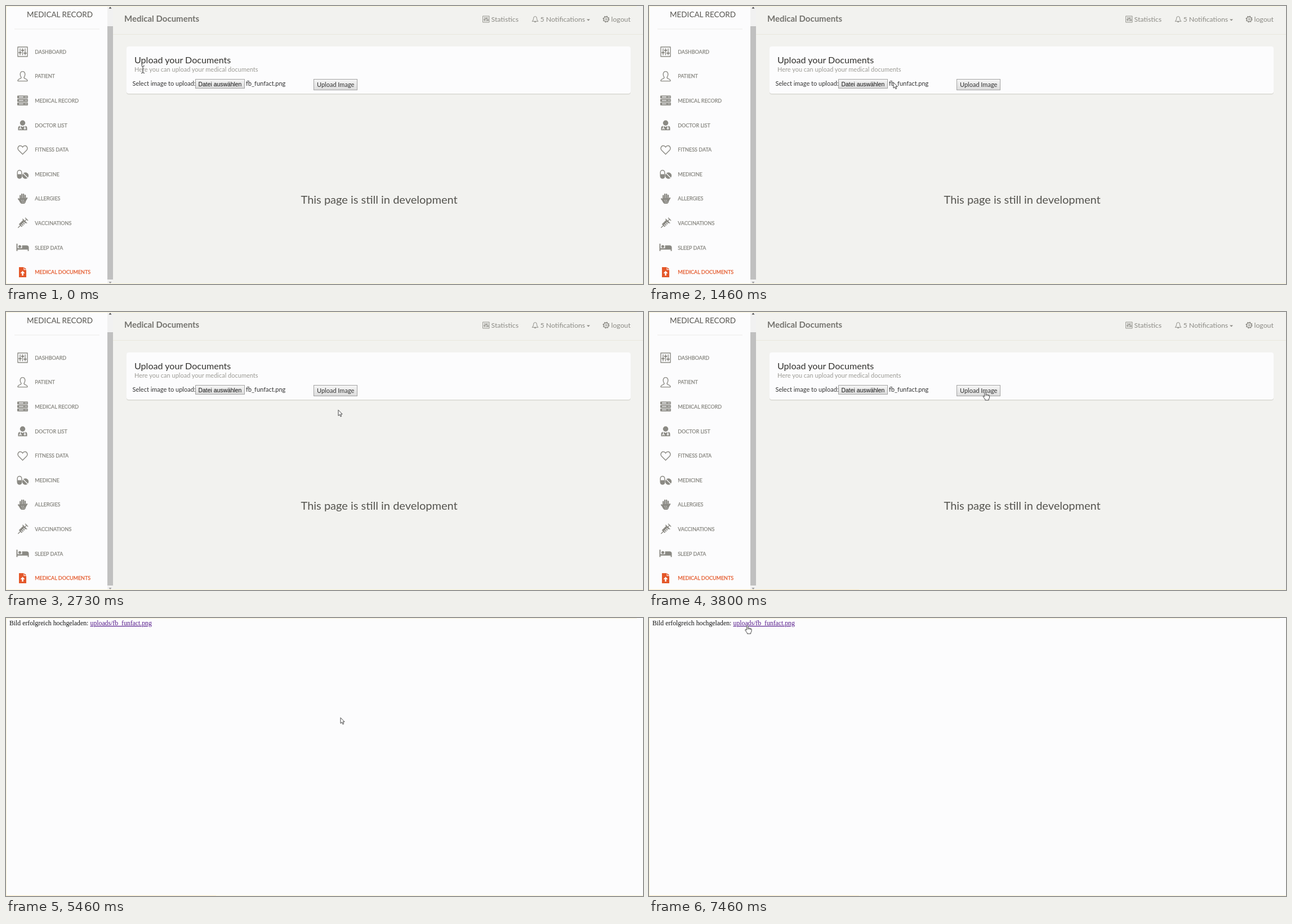
Recreate the animation shown at these times as an HTML page. Size 1131 px wide and 495 px high, loop 8000 ms.

```html
<!DOCTYPE html>
<html lang="en">
<head>
<meta charset="utf-8">
<title>Medical Documents</title>
<style>
  html, body { margin: 0; width: 100%; height: 100%; overflow: hidden; background: #fcfcfd; }
  svg { display: block; width: 1131px; height: 495px; }
  text { font-family: Lato, "Open Sans", sans-serif; white-space: pre; }
  .arial { font-family: "Liberation Sans", Arial, sans-serif; }
  .times text { font-family: "Liberation Serif", "Times New Roman", serif; font-size: 11.75px; }
  .menu text { font-size: 9px; stroke-width: .25px; }
  .line { fill: none; stroke: #8b8a84; stroke-width: 1.4; stroke-linejoin: round; stroke-linecap: round; }
  .solid { fill: #8b8a84; }
  .white { fill: none; stroke: #fcfcfd; stroke-width: 1.3; }
</style>
</head>
<body>
<svg viewBox="0 0 1131 495">
  <defs>
    <linearGradient id="face" x2="0" y2="1">
      <stop stop-color="#f6f6f6"/><stop offset="1" stop-color="#dcdcdc"/>
    </linearGradient>
    <g id="sliders">
      <rect x="-8.5" y="-8.5" width="17" height="17"/>
      <path d="M-4.5-5.500V5.500M0-5.500V5.500M4.500-5.500V5.500"/>
      <path d="M-6 1.500h3M-1.500-2.500h3M3 2.500h3" stroke-width="2.400"/>
    </g>
  </defs>

  <g id="portal">
    <rect width="1131" height="495" fill="#f2f2ef"/>
    <rect width="180" height="495" fill="#fcfcfd"/>
    <path d="M15 41H166" stroke="#ecebe8"/>
    <text x="37" y="19.5" font-size="13.5" fill="#55544f">MEDICAL RECORD</text>
    <g id="menu" class="menu"></g>

    <rect x="180" width="10" height="495" fill="#f1f1f1"/>
    <rect x="180" y="36" width="10" height="451" fill="#c0c0c0"/>
    <path d="M182.500 4.500L185 1.500L187.500 4.500Z" fill="#444"/>
    <path d="M182.500 491L185 494L187.500 491Z" fill="#999"/>

    <path d="M190 50.500H1131" stroke="#e9e7dc"/>
    <text x="210" y="27.500" font-size="15" font-weight="700" fill="#74736e">Medical Documents</text>
    <g class="line" stroke-width="1">
      <use href="#sliders" transform="translate(852.500 23.500) scale(.65)"/>
      <path d="M934.500 27Q936.500 25.500 936.500 22.500Q936.500 18.500 939.500 18.500T942.500 22.500Q942.500 25.500 944.500 27ZM938.500 28.500h2" style="stroke-width:1"/>
      <circle cx="1065.500" cy="23.500" r="4.300"/>
      <circle cx="1065.500" cy="23.500" r="1.600" style="stroke-width:1"/>
      <circle cx="1065.500" cy="23.500" r="5.300" style="stroke-dasharray:2 2.160;stroke-linecap:butt"/>
    </g>
    <g font-size="12.3" fill="#8b8a84">
      <text x="861.500" y="28">Statistics</text>
      <text x="948.500" y="28">5 Notifications</text>
      <text x="1074.500" y="28">logout</text>
      <path d="M1031 23.500h6l-3 3Z"/>
    </g>

    <rect x="214" y="73.500" width="895" height="84" rx="4" fill="#d9d8d2"/>
    <rect x="214" y="72" width="895" height="84" rx="4" fill="#fcfcfd"/>
    <text x="228" y="102" font-size="16.1" fill="#33322f">Upload your Documents</text>
    <text x="228" y="117" font-size="11" fill="#9c9b95">Here you can upload your medical documents</text>
    <g font-size="11" fill="#333">
      <text x="224.500" y="142">Select image to upload:</text>
      <text x="426" y="142">fb_funfact.png</text>
      <g fill="url(#face)" stroke="#a3a3a3">
        <rect x="336.500" y="130.500" width="87" height="16"/>
        <rect x="546.500" y="130.500" width="77" height="19"/>
      </g>
      <text x="341.500" y="142.500" class="arial" font-size="10.4" fill="#111">Datei auswählen</text>
      <text x="552" y="144">Upload Image</text>
    </g>
    <text x="523.500" y="352" font-size="20" fill="#55544f">This page is still in development</text>
    <g id="tip">
      <rect x="436" y="151" width="64" height="15" fill="#bbb" opacity=".6"/>
      <rect x="434.500" y="149.500" width="63" height="14" fill="#fcfcfd" stroke="#aaa"/>
      <text x="438" y="160" font-size="8.900" fill="#888">fb_funfact.png</text>
    </g>
  </g>

  <g id="done" class="times">
    <rect width="1131" height="495" fill="#fcfcfd"/>
    <text x="6" y="13" fill="#111">Bild erfolgreich hochgeladen:</text>
    <text x="149.500" y="13" fill="#551a8b" text-decoration="underline">uploads/fb_funfact.png</text>
  </g>

  <path d="M1120 .5H.5V494.500H1131" fill="none" stroke="#faf3d6"/>
  <path id="edge" d="M0 494.500H373" stroke="#fae9c2"/>

  <g id="cursor" fill="#fff" stroke="#333" stroke-linejoin="round">
    <path id="beam" d="M-3-6.500Q0-6.500 0-5Q0-6.500 3-6.500M0-5V5M-3 6.500Q0 6.500 0 5Q0 6.500 3 6.500" fill="none"/>
    <path id="arrow" d="M0 0V10.200L2.400 8L4 11.800L5.700 11L4.100 7.400H7.200Z" stroke-width=".9"/>
    <path id="hand" d="M-1.200 1.200Q0-.6 1.200 1.200V5Q2.500 4 3.400 5.400Q4.700 4.500 5.600 6Q7.400 5.500 7.500 7.200V10Q7.500 12 6.200 13V15H-.2V13.500L-3.600 9Q-4 7-2.300 7.500L-1.200 8.700ZM1.200 5V7.500M3.400 5.500V7.500M5.600 6V8" stroke-width=".9"/>
  </g>
</svg>

<script>
const LOOP = 8000, STEP = 200 / 3, PAGE_SWAP = 5460;
const $ = id => document.getElementById(id);

// Each icon is drawn around its own centre.
const menu = [
  ['DASHBOARD', '<use href="#sliders" class="line"/>'],
  ['PATIENT', '<path class="line" d="M-2.500 2Q-4.500-1-4.300-4Q-3.800-8.500 0-8.500T4.300-4Q4.500-1 2.500 2Q2.500 4 5 4.500Q8.500 5.300 8.500 8.500H-8.500Q-8.500 5.300-5 4.500Q-2.500 4-2.500 2Z"/>'],
  ['MEDICAL RECORD', [-6.7, -.5, 5.7].map(y =>
    `<rect class="solid" x="-9.500" y="${y - 2.6}" width="19" height="5.200" rx="1"/><path class="white" d="M-6.500 ${y}h8M4 ${y}h1.500M6.500 ${y}h1.500"/>`).join('')],
  ['DOCTOR LIST', '<circle class="solid" cy="-4" r="4.700"/><path class="solid" d="M-8 9V5Q-8 1.500-4 1.300L0 3L4 1.300Q8 1.500 8 5V9Z"/><path class="white" d="M-4 1V5M4 1V4M-5.500 7.500Q-5.500 5-4 5T-2.500 7.500"/><circle class="white" cx="4" cy="5.500" r="1.200"/>'],
  ['FITNESS DATA', '<path class="line" d="M0 8L-7.200.8C-10-2.500-7.500-7.500-4-7.200C-2-7.200-.8-5.800 0-4.500C.8-5.800 2-7.200 4-7.200C7.500-7.500 10-2.500 7.200.8Z"/>'],
  ['MEDICINE', '<rect class="line" x="-9.300" y="-7" width="7.600" height="14" rx="3.800"/><path class="solid" d="M-9.500 0H-1.500V4A4 4 0 0 1-9.500 4Z"/><circle class="solid" cx="5" cy="2.500" r="5.700"/><path class="white" d="M1-1.500L9 6.500"/>'],
  ['ALLERGIES', '<path d="M-4.200 0V-5.500M-1.400 0V-8M1.600 0V-8M4.500 0V-6M-4 4L-7.300.3M4.500 4L7.500-1" fill="none" stroke="#8b8a84" stroke-width="2.400" stroke-linecap="round"/><path class="solid" d="M-5.500-1H5.800V3Q5.500 9 2 9H-2Q-4 8.500-6 4Z"/><path class="white" stroke-dasharray="1 2" d="M-2 3H4M-1 6H3"/>'],
  ['VACCINATIONS', '<g transform="rotate(45)"><rect class="solid" x="-3.500" y="-5" width="7" height="11"/><path class="line" d="M0 6V11M0-5V-10M-3-10H3M-5-5.300H5"/><path class="white" d="M0-2.500H3.500M0 .5H3.500M0 3.500H3.500"/></g>'],
  ['SLEEP DATA', '<path class="solid" d="M-11-7H-9V1H-1V-4H7Q11-4 11 0V6H9V3.500H-9V6H-11Z"/><circle class="solid" cx="-5" cy="-2" r="2.500"/>'],
  ['MEDICAL DOCUMENTS', '<path fill="#e4582a" d="M-6.500-9H2V-4H6.500V9H-6.500ZM3-9L6.500-5H3Z"/><path fill="#fff" d="M0-2.500L4 2H1.300V6H-1.300V2H-4Z"/>']
];
$('menu').innerHTML = menu.map(([label, icon], i) => {
  const y = 81.5 + i * 43.6, color = i === menu.length - 1 ? '#e4582a' : '#85847e';
  return `<g transform="translate(29.500 ${y})">${icon}<text x="21.700" y="3.300" fill="${color}" stroke="${color}">${label}</text></g>`;
}).join('');

// Pointer stops: time, x, y
const stops = [
  [0, 243, 113], [400, 243, 113], [933, 420.5, 145.5], [1200, 434, 136],
  [1667, 434, 136], [2000, 590, 174.5], [3000, 590, 174.5], [3467, 597, 142],
  [4600, 597, 142], [5400, 594, 177.5], [6400, 594, 177.5], [7200, 178, 22],
  [7467, 174.5, 13], [LOOP, 174.5, 13]
];

const clamp = v => Math.max(0, Math.min(1, v));

function pointerAt(t) {
  const i = Math.max(1, stops.findIndex(s => s[0] >= t));
  const [t0, x0, y0] = stops[i - 1], [t1, x1, y1] = stops[i];
  const u = clamp((t - t0) / (t1 - t0)), k = u * u * (3 - 2 * u);
  return [x0 + (x1 - x0) * k, y0 + (y1 - y0) * k];
}

function shapeAt(x, y, uploaded) {
  const inside = (l, t, r, b) => x >= l && x <= r && y >= t && y <= b;
  if (uploaded) return inside(149, 0, 259, 16) ? 'hand' : 'arrow';
  if (inside(546, 130, 624, 150)) return 'hand';
  return inside(224, 88, 446, 120) ? 'beam' : 'arrow';
}

const show = (id, on) => $(id).setAttribute('visibility', on ? 'visible' : 'hidden');

function draw(t) {
  const uploaded = t >= PAGE_SWAP;
  const tick = Math.min(LOOP, Math.floor((t + 7) / STEP) * STEP);
  const [x, y] = pointerAt(tick), shape = shapeAt(x, y, uploaded);
  show('portal', !uploaded);
  show('done', uploaded);
  show('edge', t >= 3800);
  for (const id of ['beam', 'arrow', 'hand']) show(id, id === shape);
  $('cursor').setAttribute('transform', `translate(${x.toFixed(1)} ${y.toFixed(1)})`);
  $('tip').setAttribute('opacity', clamp((tick - 1600) / 130) * clamp((2330 - tick) / 190));
}

const start = performance.now();
function frame() {
  draw((performance.now() - start) % LOOP);
  requestAnimationFrame(frame);
}
frame();
</script>
</body>
</html>
```
